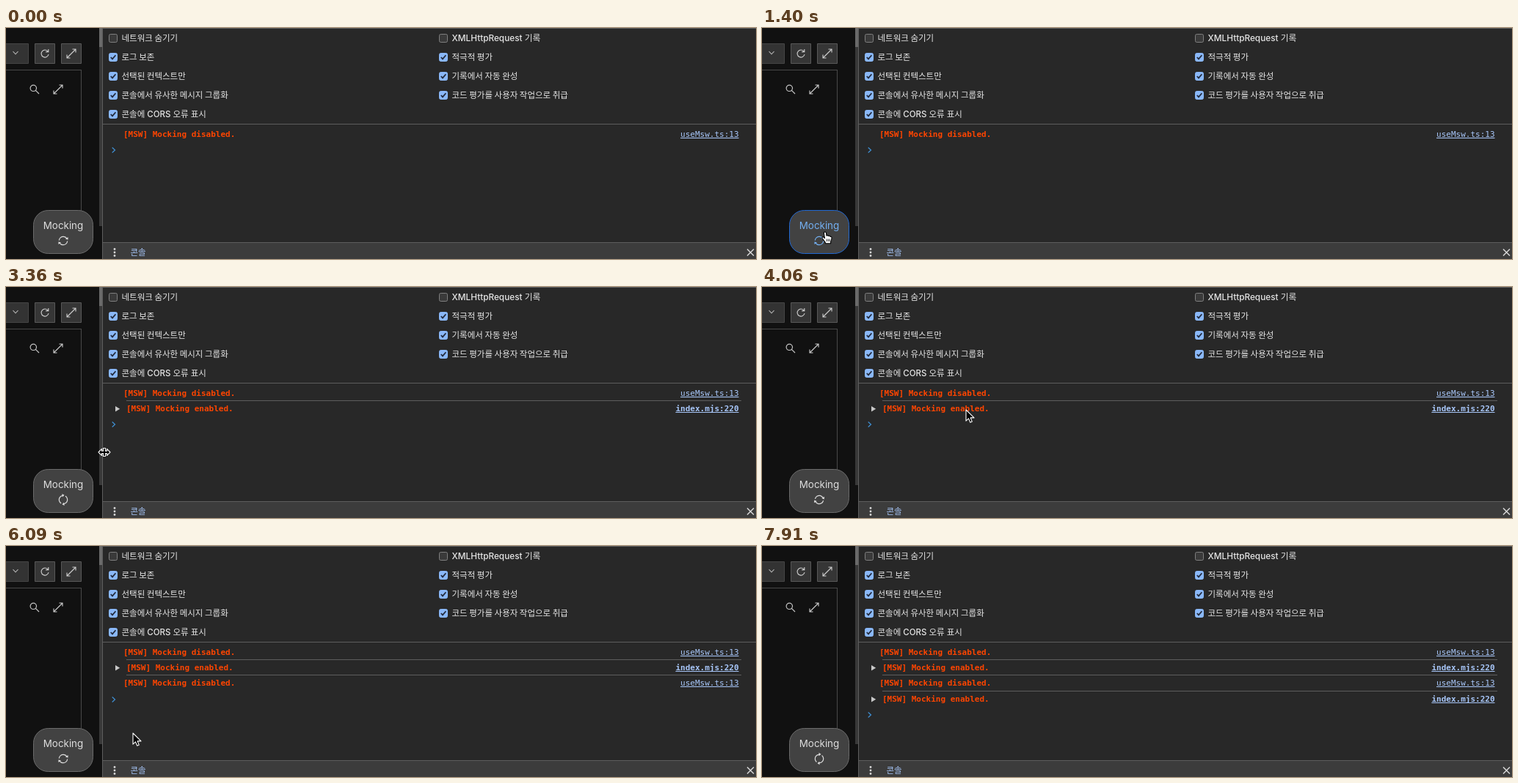
An HTML page with a canvas for the animation above (7.98 s loop, 1022 by 316 pixels).

```html
<!DOCTYPE html>
<html lang="ko">
<head>
<meta charset="utf-8">
<title>Mocking toggle</title>
<style>
html, body { margin: 0; width: 100%; height: 100%; overflow: hidden; background: #282828; }
canvas { display: block; width: 1022px; height: 316px; }
</style>
</head>
<body>
<canvas id="stage"></canvas>
<script>
const LOOP = 7980, STEP = 70, W = 1022, H = 316;
const canvas = document.getElementById('stage');
const ctx = canvas.getContext('2d');
const dpr = window.devicePixelRatio || 1;
canvas.width = W * dpr;
canvas.height = H * dpr;

const KR = '"Noto Sans CJK KR", "Noto Sans CJK JP", "Noto Sans CJK", sans-serif';
const MIXED = 'Inter, ' + KR;
const MONO = '"DejaVu Sans Mono", monospace';
const LINE = '#5e5e5e';

// Pointer path: time, x, y, kind; linear between keys
const pointerKeys = [
  [210, 481, 300, 'arrow'], [350, 330, 262, 'arrow'], [490, 225, 242, 'arrow'],
  [630, 157, 254, 'arrow'], [700, 148, 260, 'arrow'], [770, 148, 260, 'arrow'],
  [1050, 84, 278, 'arrow'], [1330, 84, 278, 'arrow'],
  [1400, 86, 279, 'hand'], [2310, 86, 279, 'hand'],
  [2450, 124, 262, 'arrow'], [2730, 134, 226, 'resize'], [3570, 134, 226, 'resize'],
  [3640, 152, 218, 'arrow'], [3990, 278, 168, 'arrow'], [4410, 278, 168, 'arrow'],
  [4480, 100, 269, 'hand'], [4900, 100, 269, 'hand'],
  [4970, 150, 235, 'arrow'], [5040, 276, 168, 'arrow'], [5110, 174, 260, 'arrow'],
  [6020, 174, 260, 'arrow'], [6090, 173, 256, 'arrow'], [6300, 118, 268, 'arrow'],
  [6370, 100, 272, 'hand'], [6580, 100, 272, 'hand'], [6720, 122, 280, 'hand'],
  [6790, 135, 292, 'arrow'], [6930, 165, 320, 'arrow']
];

const hovers = [
  { on: 1330, rise: 80, off: 2370, fall: 210, edge: [22, 104, 225] },
  { on: 4400, rise: 220, off: 4960, fall: 150, edge: [50, 128, 250] },
  { on: 6290, rise: 80, off: 6780, fall: 200, edge: [22, 104, 225] }
];
const spins = [[2041, 4620], [6567, LOOP]];

const logs = [
  { at: 0, y: 145.5, on: false },
  { at: 2100, y: 166.5, on: true },
  { at: 4620, y: 187.5, on: false },
  { at: 6650, y: 209.5, on: true }
];
const promptY = [167, 188, 210, 231];

const options = [
  [140, 14, '네트워크 숨기기', false], [140, 40, '로그 보존', true],
  [140, 66, '선택된 컨텍스트만', true], [140, 92, '콘솔에서 유사한 메시지 그룹화', true],
  [140, 118, '콘솔에 CORS 오류 표시', true, 11.5], [590, 14, 'XMLHttpRequest 기록', false, 11.8],
  [590, 40, '적극적 평가', true], [590, 66, '기록에서 자동 완성', true],
  [590, 92, '코드 평가를 사용자 작업으로 취급', true]
];

const clamp = v => Math.max(0, Math.min(1, v));
const mix = (a, b, k) => 'rgb(' + a.map((v, i) => Math.round(v + (b[i] - v) * k)).join(',') + ')';

function rect(x, y, w, h, color) {
  ctx.fillStyle = color;
  ctx.fillRect(x, y, w, h);
}

function box(x, y, w, h, r, fill, edge) {
  ctx.beginPath();
  ctx.roundRect(x + .5, y + .5, w - 1, h - 1, r);
  ctx.fillStyle = fill;
  ctx.fill();
  ctx.strokeStyle = edge;
  ctx.lineWidth = 1;
  ctx.stroke();
}

function stroke(d, x, y, color, width = 1.2) {
  ctx.save();
  ctx.translate(x, y);
  ctx.strokeStyle = color;
  ctx.lineWidth = width;
  ctx.stroke(new Path2D(d));
  ctx.restore();
}

function text(str, x, y, font, color, align = 'left') {
  ctx.font = font;
  ctx.fillStyle = color;
  ctx.textAlign = align;
  ctx.textBaseline = 'alphabetic';
  ctx.fillText(str, x, y);
}

function expandIcon(x, y) {
  stroke('M-6 6L6 -6M1.5 -6H6V-1.5M-1.5 6H-6V1.5', x, y, '#cfcfcf', 1.1);
}

function drawPage() {
  rect(0, 0, 132, H, '#111111');
  box(-4, 21, 35, 28, 0, '#333333', '#454545');
  stroke('M-3.5 -2L0 1.8L3.5 -2', 13, 34, '#bdbdbd', 1.1);
  box(39, 21, 28, 28, 0, '#363636', '#585858');
  box(75, 21, 28, 28, 0, '#363636', '#585858');
  stroke('M4.2 -2.8A5 5 0 1 0 5 1M4.8 -6V-2.4H1.2', 53, 35, '#d0d0d0', 1.1);
  expandIcon(89, 35);
  rect(0, 57, 103, 1, '#484848');
  rect(102, 57, 1, 215, '#484848');
  stroke('M3 -1.2A4.2 4.2 0 1 1 -5.4 -1.2A4.2 4.2 0 1 1 3 -1.2M1.9 1.9L6.5 6.5', 38.5, 83.5, '#c4c4c4', 1.2);
  expandIcon(71, 84);
  rect(127, 0, 4, 271, '#383838');
  rect(127, 0, 4, 26, '#6a6a6a');
}

function drawOption([x, y, label, checked, mixedSize]) {
  box(x, y - 6, 12, 12, 2, checked ? '#8ab8f8' : '#3a3a3a', checked ? '#8ab8f8' : '#808080');
  if (checked) stroke('M-3.2 0L-1 2.4L3.4 -2.8', x + 6, y, '#20283a', 1.7);
  const font = mixedSize ? `500 ${mixedSize}px ${MIXED}` : `500 11.5px ${KR}`;
  text(label, x + 17.5, y + 4, font, '#e6e6e6');
}

function drawLog({ y, on }, first) {
  const base = y + 3.8;
  if (!first) rect(164, Math.floor(y) - 11, 838, 1, LINE);
  if (on) {
    ctx.fillStyle = '#c8c8c8';
    ctx.fill(new Path2D(`M149 ${y - 3.5}L155.2 ${y + .3}L149 ${y + 4.1}Z`));
  }
  text(`[MSW] Mocking ${on ? 'enabled' : 'disabled'}.`, on ? 164 : 160, base, `bold 11px ${MONO}`, '#ff4500');
  const link = on ? 'index.mjs:220' : 'useMsw.ts:13';
  const color = '#a8c7fa';
  text(link, 998.5, base, `${on ? 'bold ' : ''}11px ${MONO}`, color, 'right');
  const width = ctx.measureText(link).width;
  rect(998.5 - width, Math.round(base + 1), width, 1, color);
}

function drawConsole(t) {
  rect(132, 0, W - 132, H, '#282828');
  rect(131, 0, 1, H, LINE);
  rect(131, 0, W - 131, 1, LINE);
  options.forEach(drawOption);
  rect(132, 131, W - 132, 1, LINE);
  const shown = logs.filter(l => t >= l.at);
  shown.forEach((l, i) => drawLog(l, i === 0));
  stroke('M-2 -3.5L1.8 0L-2 3.5', 146.7, promptY[shown.length - 1], '#3f91d6', 1.2);

  rect(132, 293, W - 132, 23, '#3c3c3c');
  rect(132, 293, W - 132, 1, LINE);
  for (const y of [302.5, 307, 311.5]) {
    ctx.beginPath();
    ctx.arc(148, y, 1.4, 0, 7);
    ctx.fillStyle = '#d6d6d6';
    ctx.fill();
  }
  text('콘솔', 169.5, 311, `500 11.5px ${KR}`, '#a8c7fa');
  stroke('M-4.5 -4.5L4.5 4.5M4.5 -4.5L-4.5 4.5', 1014.5, 307, '#d6d6d6', 1.5);
}

function hoverAt(t) {
  const h = hovers.find(s => t >= s.on && t < s.off + s.fall);
  if (!h) return { level: 0, edge: [0, 0, 0] };
  return { level: Math.min(clamp((t - h.on) / h.rise), 1 - clamp((t - h.off) / h.fall)), edge: h.edge };
}

function drawButton(t) {
  const { level, edge } = hoverAt(t);
  const ink = mix([222, 222, 222], [101, 169, 245], level);
  const pressed = t >= 1820 && t < 1960;
  box(37, 249, 82, 60, 20, pressed ? '#3d3d3d' : '#424242', mix([107, 107, 107], edge, level));
  text('Mocking', 78, 275, '400 13.4px Inter, sans-serif', ink, 'center');

  const spin = spins.find(([a, b]) => t >= a && t < b);
  ctx.save();
  ctx.translate(78, 291);
  ctx.rotate(spin ? (t - spin[0]) / 1000 * Math.PI * 2 : 0);
  ctx.strokeStyle = ctx.fillStyle = ink;
  ctx.lineWidth = 1.2;
  for (let i = 0; i < 2; i++) {
    ctx.beginPath();
    ctx.arc(0, 0, 5.7, Math.PI * 1.03, Math.PI * 1.82);
    ctx.stroke();
    ctx.fill(new Path2D('M6.5 -5L6.6 -1.4L3 -2.3Z'));
    ctx.rotate(Math.PI);
  }
  ctx.restore();
}

const shapes = {
  arrow: ['M0 0V15.2L3.5 11.9L5.8 17.2L8.3 16.1L6.1 10.9H11Z', '#000', '#fff'],
  hand: ['M-1.6 1.2C-1.6 -.4 1.2 -.4 1.4 1.2L2 5.2C2.6 4.3 4.2 4.5 4.5 5.6C5.3 4.9 6.7 5.3 6.9 6.4' +
    'C7.8 5.9 9 6.5 9 7.8C9 11 8.2 12 7.6 13.4V15.8H.2V14.2C-1.2 12.6 -2.4 10.4 -3.8 8.8' +
    'C-4.8 7.4 -3 6.2 -1.7 7.4L-.6 8.6Z', '#fff', '#000'],
  resize: ['M-8 0L-3.5 -4.5V-1.5H-1.5V-5.5H1.5V-1.5H3.5V-4.5L8 0L3.5 4.5V1.5H1.5V5.5H-1.5V1.5H-3.5V4.5Z', '#000', '#fff']
};

function drawPointer(t) {
  const i = pointerKeys.findIndex(k => k[0] > t) - 1;
  if (i < 0) return;
  const [t0, x0, y0, kind] = pointerKeys[i], [t1, x1, y1] = pointerKeys[i + 1];
  const k = (t - t0) / (t1 - t0);
  const [d, fill, edge] = shapes[kind];
  const path = new Path2D(d);
  ctx.save();
  ctx.translate(x0 + (x1 - x0) * k, y0 + (y1 - y0) * k);
  ctx.lineJoin = 'round';
  ctx.lineWidth = 1.1;
  ctx.fillStyle = fill;
  ctx.strokeStyle = edge;
  ctx.fill(path);
  ctx.stroke(path);
  if (kind === 'hand') stroke('M2.1 9.5V13M4.2 9.5V13M6.2 9.5V13', 0, 0, '#000', .8);
  ctx.restore();
}

function frame() {
  const t = Math.floor((performance.now() % LOOP) / STEP) * STEP;
  ctx.setTransform(dpr, 0, 0, dpr, 0, 0);
  drawPage();
  drawConsole(t);
  drawButton(t);
  drawPointer(t);
  requestAnimationFrame(frame);
}
frame();
</script>
</body>
</html>
```
